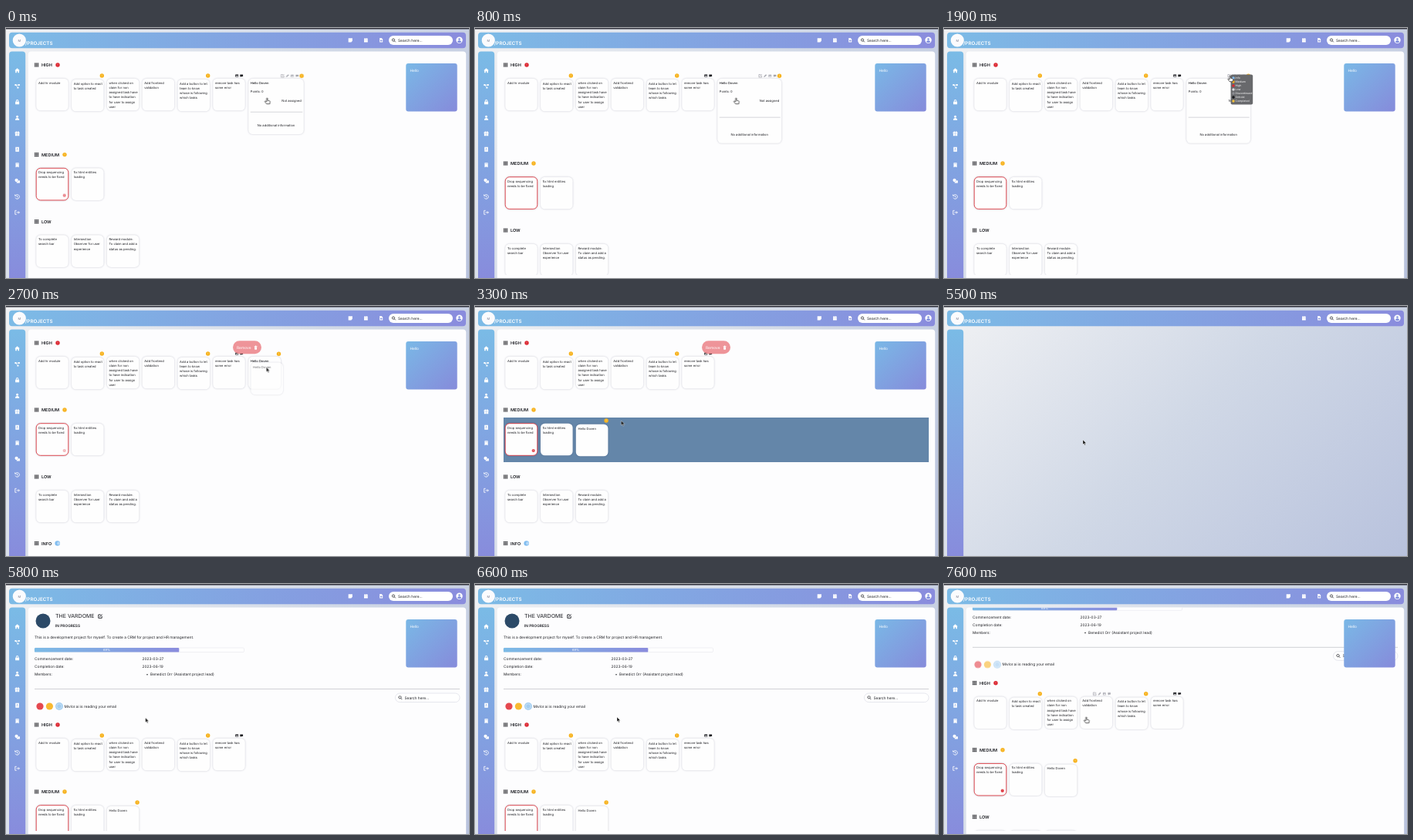
These frames come from a looping animation (600x325 px, 7.7 s). An HTML page:

```html
<!DOCTYPE html>
<html lang="en">
<head>
<meta charset="utf-8">
<title>Project board</title>
<style>
@property --open { syntax: "<number>"; inherits: true; initial-value: 0; }
@property --scroll { syntax: "<number>"; inherits: true; initial-value: -135; }

html, body { margin: 0; width: 100%; height: 100%; overflow: hidden; }
svg { display: block; width: 600px; height: 325px; animation: open 7.7s infinite linear, scroll 7.7s infinite linear; }
text { font-family: Inter, "Open Sans", sans-serif; font-size: 4.82px; fill: #1c1d22; text-rendering: geometricPrecision; white-space: pre; }
.small { font-size: 4.1px; }
.head { font-size: 5.5px; font-weight: 600; }
.white { fill: #fff; }
.card { fill: #fefefe; filter: drop-shadow(0 .7px 1.1px rgba(50, 55, 90, .27)); }
.alert { stroke: #dd3840; stroke-width: .9px; }

#list { transform: translateY(calc(var(--scroll) * 1px)); }
#lower { transform: translateY(calc(var(--open) * 41px)); }
.grow { width: calc(42px + 41px * var(--open)); height: calc(42px + 42px * var(--open)); }
.right { transform: translateX(calc(41px * var(--open))); }
.detail { opacity: calc((var(--open) - .5) * 5); }
.line { transform: translateY(calc(25px + 25px * var(--open))); }
.rule { width: calc(38px + 41px * var(--open)); }
.foot { transform: translate(calc(20.5px * var(--open)), calc(42px * var(--open))); }

/* hard on/off switches */
.wait, .board, .icons, .task, .moved, .menu, .drag, .pill, .zone, .tools, .hover, .hand, .arrow {
  animation: 7.7s infinite step-end;
}
.board { animation-name: board; }
.icons { animation-name: icons; }
.task { animation-name: task; }
.moved { animation-name: moved; }
.menu { animation-name: menu; }
.drag { animation-name: drag; }
.pill { animation-name: pill; }
.zone { animation-name: zone; }
.tools { animation-name: tools; }
.hover { animation-name: hover; }
.hand { animation-name: hand; }
.arrow { animation-name: arrow; }
@keyframes board { 0%, 75.3% { opacity: 1; } 67.5% { opacity: 0; } }
@keyframes icons { 0%, 74% { opacity: 1; } 67.5% { opacity: 0; } }
@keyframes task { 0% { opacity: 1; } 42.8%, 100% { opacity: 0; } }
@keyframes moved { 0% { opacity: 0; } 42.8%, 100% { opacity: 1; } }
@keyframes menu { 0%, 29.9%, 100% { opacity: 0; } 19.5% { opacity: 1; } }
@keyframes drag { 0%, 42.8%, 100% { opacity: 0; } 33.8% { opacity: .65; } }
@keyframes pill { 0%, 46.7%, 100% { opacity: 0; } 33.8% { opacity: .95; } }
@keyframes zone { 0%, 46.7%, 100% { opacity: 0; } 37.6% { opacity: 1; } }
@keyframes tools { 0% { opacity: 1; } 33.8%, 100% { opacity: 0; } }
@keyframes hover { 0% { opacity: 0; } 92.2%, 100% { opacity: 1; } }
@keyframes hand { 0%, 92.2%, 100% { opacity: 1; } 32.4% { opacity: 0; } }
@keyframes arrow { 0%, 92.2%, 100% { opacity: 0; } 32.4% { opacity: 1; } }

/* continuous motion */
#cursor { animation: cursor 7.7s infinite ease-in-out; }
.badge { animation: badge 7.7s infinite linear; }
.chips { animation: chips 7.7s infinite ease-in-out; }
@keyframes open { 0% { --open: .72; } 2.6%, 31.2% { --open: 1; } 33.8%, 100% { --open: 0; } }
@keyframes scroll {
  0%, 70% { --scroll: -135; }
  70.01%, 87% { --scroll: 0; }
  90.9%, 100% { --scroll: -54.3; }
}
@keyframes cursor {
  0%, 10.4% { transform: translate(338.5px, 91px); }
  18.2%, 25% { transform: translate(371px, 62px); }
  29.9% { transform: translate(374px, 68px); }
  33.8% { transform: translate(345px, 76px); }
  42%, 46.7% { transform: translate(189.5px, 149px); }
  55%, 72% { transform: translate(180px, 174px); }
  84%, 88% { transform: translate(184px, 173px); }
  100% { transform: translate(184.5px, 173px); }
}
@keyframes badge { 0% { opacity: .6; } 8%, 30% { opacity: 0; } 43% { opacity: .85; } 50%, 100% { opacity: 1; } }
@keyframes chips { 0%, 86% { opacity: 1; } 98%, 100% { opacity: .62; } }
</style>
</head>
<body>
<svg id="stage" viewBox="0 0 600 325" xmlns="http://www.w3.org/2000/svg"></svg>
<script>
const RED = "#dc2832", YELLOW = "#f7b31f", BLUE = "#82bdf0", INK = "#1c1d22", GREY = "#a3a4ac";

const solid = {
  home: "M-3.3 0L0-3 3.3 0H2.4V3H.8V1H-.8V3H-2.4V0Z",
  nodes: "M-3.2-2.7h2v2h-2zM1.2-2.7h2v2h-2zM-.2.8h2v2h-2zM-1.2-2h2.4v.6h-2.4zM-1.7-.8l.5-.3L.6 1l-.5.4z",
  lock: "M-2.5-.5h5v3.4h-5zM-1.7-.5v-1a1.7 1.7 0 0 1 3.4 0v1h-.9v-1a.8.8 0 0 0-1.6 0v1z",
  user: "M0-3a1.5 1.5 0 1 1-.01 0zM-2.7 3c0-3.8 5.4-3.8 5.4 0z",
  gift: "M-3-1.7h2.8v1.6H-3zM.2-1.7H3v1.6H.2zM-2.7.3h2.5v2.6h-2.5zM.2.3h2.5v2.6H.2zM-.1-1.9c-.4-1.6-2.2-1.6-1.9 0zM.1-1.9c.4-1.6 2.2-1.6 1.9 0z",
  clip: "M-2.3-3h4.6v6h-4.6zM-.5-1.8h1v1.6h-1zM-1.2.6h2.4v.6h-2.4z",
  mark: "M-2.1-3h4.2v6L.7 2.1H-.7L-2.1 3zM-1.1-2h.8v.8h-.8zM.3-2h.8v.8H.3z",
  coins: "M-1-3a2.1 2.1 0 1 1-.01 0zM1.5-.6h1.8V2.8h-4.2V1.6a3 3 0 0 0 2.4-2.2z",
  note: "M-2.6-2.6h5.2V1L1 2.6h-3.6z",
  cal: "M-2.4-2.1h4.8v1.2h-4.8zM-2.4-.5h4.8v3.3h-4.8zM-1.6-2.9h.8v.8h-.8zM.8-2.9h.8v.8H.8z",
  doc: "M-2-2.8H.4L2-1.2v4h-4zM-.4-.5h.8v.8h.8v.8H.4v.8h-.8v-.8h-.8V.3h.8z",
  pencil: "M-2 2l.4-1.6 2.8-2.8 1.2 1.2L-.4 1.6z",
  image: "M-2.2-1.8h4.4v3.6h-4.4zM-1.6 1.2l1.2-1.5.8.8.6-1 .8 1.7z",
  chat: "M-2.1-1.7h4.2V1H0l-1.2 1.1V1h-.9z",
  trash: "M-1.9-1.8h3.8v.7h-3.8zM-1.6-.8h3.2l-.3 3.6h-2.6zM-.6-2.5H.6v.7H-.6z"
};
const outline = {
  history: "M-2.3-1.6A2.8 2.8 0 1 1-2.6 1.2M-2.9-2.9v1.8h1.8M0-1.4V.2l1 .6",
  exit: "M-.9-2.5h-1.9v5H-.9M-1 0h3.7M1.3-1.5 2.8 0 1.3 1.5",
  search: "M-.5-2.2a1.7 1.7 0 1 1-.01 0M.8.8 2.4 2.4",
  edit: "M.8-2h-2.9v4.2h4.2V-.4M-.6.8 2.4-2.4"
};

function icon(name, x, y, color = "#fff", size = 1) {
  const paint = solid[name]
    ? `fill="${color}" fill-rule="evenodd"`
    : `fill="none" stroke="${color}" stroke-width=".85"`;
  return `<path d="${solid[name] || outline[name]}" ${paint} transform="translate(${x} ${y}) scale(${size})"/>`;
}
const text = (x, y, str, cls = "", extra = "") => `<text x="${x}" y="${y}" class="${cls}" ${extra}>${str}</text>`;
const rect = (x, y, w, h, r, extra) => `<rect x="${x}" y="${y}" width="${w}" height="${h}" rx="${r}" ${extra}/>`;
const disc = (x, y, r, fill) => `<circle cx="${x}" cy="${y}" r="${r}" fill="${fill}"/>`;
const group = (cls, body, extra = "") => `<g class="${cls}" ${extra}>${body}</g>`;

// status dot with a small exclamation mark
const dot = (x, y, color, r = 2.7) => disc(x, y, r, color) +
  `<path d="M${x} ${y - r * .5}v${r * .55}m0 ${r * .25}v${r * .2}" stroke="#fff" stroke-opacity=".75" stroke-width=".5"/>`;

const tools = (x, y) => ["edit", "pencil", "image", "chat"]
  .map((name, i) => icon(name, x + i * 6.3, y, GREY, .85)).join("");

const slot = i => 39.2 + 45.8 * i;

function card(i, label, lines, mark = "") {
  const x = slot(i), dy = mark === "dot" ? 1 : 0, y = label + 17.7 + dy;
  let out = rect(x, y, 41.6, 41.6, 5.5, `class="card ${mark === "alert" ? "alert" : ""}"`);
  lines.split("/").forEach((line, n) => out += text(x + 2.7, y + 6.8 + n * 6.25, line, "small"));
  if (mark === "dot") out += dot(x + 39.3, label + 14, YELLOW);
  if (mark === "media") out += icon("image", x + 31, label + 14, INK, .9) + icon("chat", x + 37, label + 14, INK, .9);
  if (mark === "alert") out += group("badge", dot(x + 36.5, label + 53, RED, 2.1));
  return out;
}

const title = (name, y, mark = "") =>
  `<path d="M37 ${y - 1.9}h5.2M37 ${y}h5.2M37 ${y + 1.9}h5.2" stroke="${INK}" stroke-width="1.4" stroke-dasharray="1.4 .5"/>` +
  text(46, y + 2, name, "head") + mark;

const searchBox = (x, y, w, h, extra) => rect(x, y, w, h, h / 2, extra) +
  icon("search", x + 6.5, y + h / 2, INK, .95) + text(x + 12, y + h / 2 + 1.75, "Search here...");

function project() {
  const rows = [["Commencement date:", "2023-03-27"], ["Completion date:", "2023-06-19"], ["Members:", ""]];
  return disc(48, 48, 9.5, "#2c4a68") +
    text(64, 44.4, "THE VARDOME", "", 'style="font-size:7px"') + icon("edit", 122, 42, INK, 1.05) +
    text(64, 56, "IN PROGRESS", "", 'style="font-weight:600"') +
    text(37, 70.7, "This is a development project for myself. To create a CRM for project and HR management.") +
    rect(37, 83, 271.5, 5.6, 1.4, 'fill="#fff" stroke="#e4e5eb" stroke-width=".6"') +
    rect(37, 83, 187.3, 5.6, 1.2, 'fill="url(#across)"') +
    text(130.6, 87.4, "69%", "small white", 'text-anchor="middle"') +
    rows.map(([a, b], i) => text(37, 99 + i * 10.2, a) + text(176.5, 99 + i * 10.2, b)).join("") +
    disc(183, 117.8, .8, INK) + text(187, 119.4, "Benedict Orr (Assistant project lead)") +
    rect(37, 136.2, 551, .6, 0, 'fill="#b4b5bb"') +
    searchBox(504.5, 142, 83.5, 11.6, 'fill="#fff" stroke="#dcdde6" stroke-width=".7"') +
    group("chips", disc(44, 159, 4.6, "#e5484f") + disc(56.4, 159, 4.6, "#f8b931") + disc(69, 159, 5, "#a3cdf0") +
      '<circle cx="69" cy="159" r="3.3" fill="none" stroke="#d9ebfa" stroke-width=".7"/>') +
    text(75.5, 160.7, "Mivlor.ai is reading your email");
}

function openTask() {
  const x = 314.2, y = 200.8;
  return group("task",
    rect(x, y, 42, 42, 5.5, 'class="card grow"') +
    text(x + 2.6, y + 7.2, "Hello Doven", "small", 'style="font-weight:500"') +
    group("detail",
      text(x + 2.6, y + 18.6, "Points: 0", "small") +
      group("right", text(x + 39, y + 29.8, "Not assigned", "small", 'text-anchor="end"')) +
      group("line", rect(x + 2.5, y, 38, .6, 0, 'class="rule" fill="#b9bac0"')) +
      group("foot", text(x + 21, y + 32.2, "No additional information", "small", 'text-anchor="middle"'))) +
    group("right", group("tools", tools(x + 14.5, y - 3.6)) + dot(x + 39.3, y - 3.6, YELLOW)));
}

function lists() {
  const high = [["Add hr module"], ["Add option to react/to task created", "dot"],
    ["when clicked on/claim for non/assigned task have/to have indication/for user to assign/user"],
    ["Add frontend/validation"], ["Add a button to let/team to know/whose is following/which tasks", "dot"],
    ["remove task has/some error", "media"]];
  const low = [["To complete/search bar"], ["Intersection/Observer for user/experience"],
    ["Reward module./To claim and add a/status as pending."]];
  const row = (items, y) => items.map(([lines, mark], i) => card(i, y, lines, mark)).join("");
  return title("HIGH", 183, dot(67, 183, RED)) + row(high, 183) +
    group("hover", tools(slot(3) + 18.6, 197)) + openTask() +
    group("", group("zone", rect(37, 280, 551, 58, 0, 'fill="#6486a9"')) +
      title("MEDIUM", 270, dot(76, 270, YELLOW)) +
      card(0, 270, "Drop sequencing/needs to be fixed", "alert") +
      card(1, 270, "fix html entities/loading") +
      group("moved", card(2, 270, "Hello Doven", "dot")) +
      title("LOW", 357) + row(low, 357) +
      title("INFO", 443.5, disc(66.7, 443.5, 3.3, BLUE) + disc(68, 443.5, 1.9, "#b6d9f7")), 'id="lower"');
}

function menu() {
  const items = [["Info", BLUE], ["Medium", YELLOW], ["High", RED], ["Low", "#d9dade"],
    ["Discontinued", "#8d8e93"], ["Onhold", "#17181b"], ["Completed", "#f2c23e"]];
  return group("menu", rect(371.6, 60.6, 28.6, 39, 2, 'fill="#68696c"') +
    items.map(([name, color], i) => disc(375, 65 + i * 5, 1.7, color) +
      text(377.6, 66.3 + i * 5, name, "white", 'style="font-size:3.5px"')).join(""));
}

const removePill = group("pill", rect(294, 45.3, 37, 17, 8.5, 'fill="#ee8f94"') +
  text(299, 55.8, "Remove", "white", 'style="font-size:4.9px"') + icon("trash", 323.6, 54));

const side = ["home", "nodes", "lock", "user", "gift", "clip", "mark", "coins", "history", "exit"]
  .map((name, i) => icon(name, 14.6, 55.3 + i * 20.5)).join("");

const header = rect(4, 5.7, 592, 20.6, 4, 'fill="url(#across)"') +
  disc(17.3, 16, 8.6, "#fbfbfd") + text(17.3, 17.5, "M", "small", 'text-anchor="middle" style="fill:#7d8094"') +
  text(25, 21.7, "/PROJECTS", "white", 'style="font-size:6.25px;font-weight:600"') +
  group("icons", icon("note", 446.3, 15.8)) + icon("cal", 466.4, 15.8) + icon("doc", 486.2, 15.8) +
  searchBox(496, 10, 83, 12, 'fill="#fff"') +
  disc(587.5, 15.8, 4.2, "#fff") + disc(587.5, 14.5, 1.3, "#7f8fdd") +
  '<path d="M584.9 18c.6-2.2 4.6-2.2 5.2 0a3.6 3.6 0 0 1-5.2 0z" fill="#7f8fdd"/>';

const ghost = group("drag", rect(-20, -6, 41.6, 41.6, 5.5, 'class="card"') + text(-17.3, 1, "Hello Doven", "small"));
const pointer = group("", ghost +
  group("arrow", '<path d="M0 0v6l1.4-1.2 1 2.3 1-.4-1-2.3h1.9z" fill="#111" stroke="#fff" stroke-width=".4"/>') +
  group("hand", '<path d="M-.8.7c0-1 1.4-1 1.4 0v2.5l2.2.5c.8.2 1 .7.9 1.4l-.4 2.6h-4.2l-2-2.8c-.5-.8.4-1.3 1-.8l1.1.9z" fill="#fff" stroke="#222" stroke-width=".7"/>'),
  'id="cursor"');

const ramp = (id, x2, y2, ...colors) => `<linearGradient id="${id}" x2="${x2}" y2="${y2}">` +
  colors.map((c, i) => `<stop offset="${i / (colors.length - 1)}" stop-color="${c}"/>`).join("") + "</linearGradient>";

document.getElementById("stage").innerHTML = `<defs>
  ${ramp("across", 1, 0, "#7cbbe6", "#8a8cdd")}${ramp("down", 0, 1, "#7abbe6", "#888bdc")}
  ${ramp("note", 1, 1, "#7ab8e6", "#868bdb")}
  <linearGradient id="page" gradientUnits="userSpaceOnUse" x1="69" y1="-69" x2="531" y2="394">
    <stop stop-color="#f1f2f4"/><stop offset=".5" stop-color="#d0d8e6"/><stop offset="1" stop-color="#b8c2dd"/>
  </linearGradient>
  <clipPath id="view"><rect x="29" y="30.7" width="567" height="289.5"/></clipPath></defs>` +
  rect(0, 0, 600, 325, 0, 'fill="url(#page)"') + rect(0, 0, 600, 1.5, 0, 'fill="#34353f"') +
  group("board",
    rect(28.7, 30.5, 567.5, 300, 4, 'fill="#fdfdfe"') +
    group("", group("", project() + lists(), 'id="list"'), 'clip-path="url(#view)"') +
    rect(518.3, 46, 66.4, 62.5, 3, 'fill="url(#note)"') + text(523.4, 56.6, "Hello", "white") +
    menu() + removePill) +
  header + rect(4, 30.5, 21.2, 300, 4, 'fill="url(#down)"') + group("icons", side) + pointer;
</script>
</body>
</html>
```
